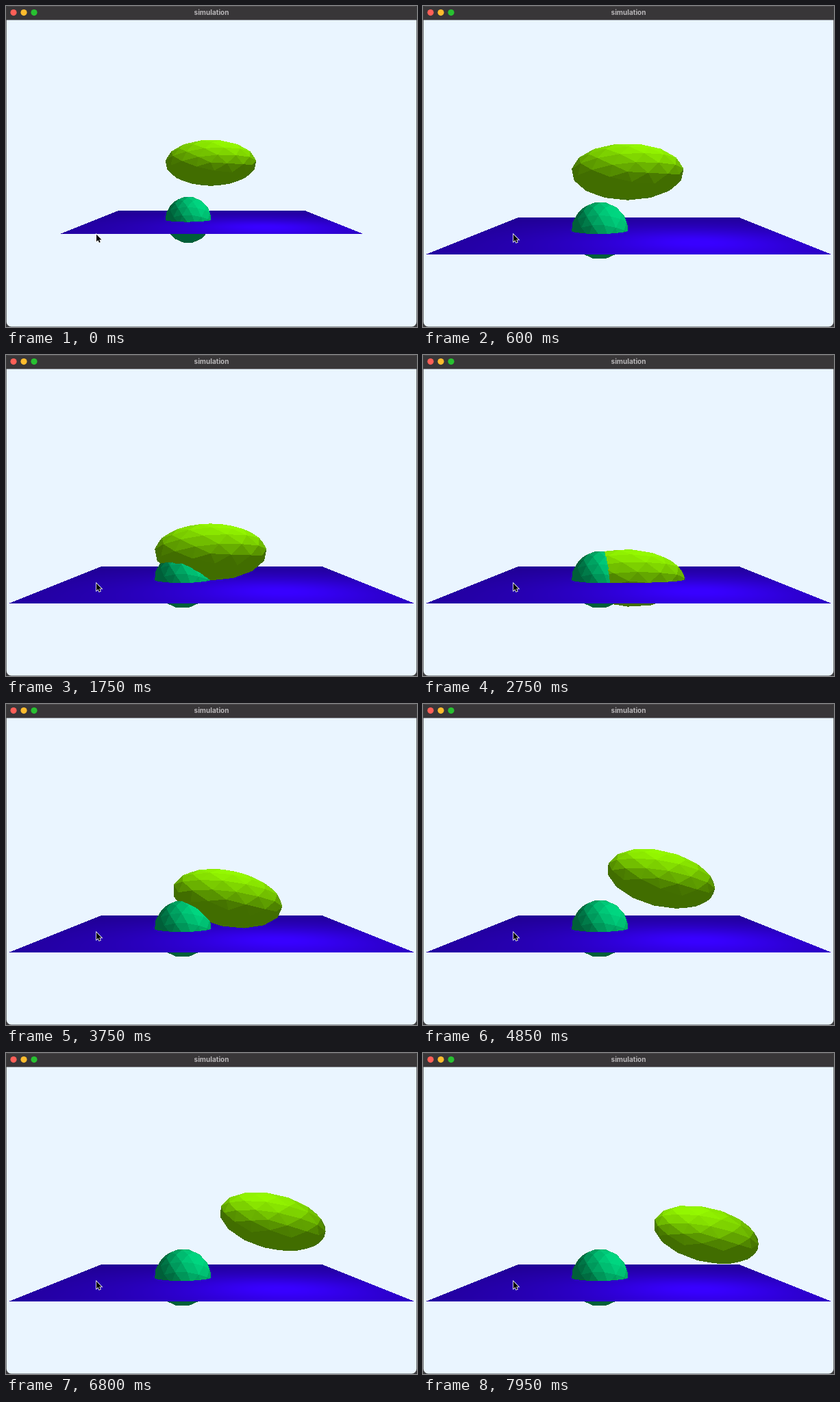
An HTML page with a canvas for the animation above (8 s loop, 600 by 469 pixels).

```html
<!DOCTYPE html>
<html lang="en">
<head>
<meta charset="utf-8">
<title>simulation</title>
<style>
  html, body { margin: 0; width: 100%; height: 100%; overflow: hidden; background: #2a2a2a; }
  canvas { display: block; }
</style>
</head>
<body>
<canvas id="stage" width="600" height="469"></canvas>
<script>
const W = 600, H = 469, BAR = 20.5, LOOP = 8000;
const FOCAL = 710.4, CX = 300, HORIZON = 244.5, EYE = 2, HALF_PLANE = 5;
const ctx = document.getElementById('stage').getContext('2d');
const image = ctx.createImageData(W, H);
const pixels = new Uint32Array(image.data.buffer);
const depth = new Float32Array(W * H);

const rgb = (color, level) => {
  const [r, g, b] = color.map(c => Math.min(255, c * level));
  return (255 << 24 | b << 16 | g << 8 | r) >>> 0;
};
const sub = (a, b) => a.map((v, i) => v - b[i]);
const dot = (a, b) => a[0] * b[0] + a[1] * b[1] + a[2] * b[2];
const cross = (a, b) => [a[1] * b[2] - a[2] * b[1], a[2] * b[0] - a[0] * b[2], a[0] * b[1] - a[1] * b[0]];
const unit = v => { const n = Math.hypot(...v); return v.map(c => c / n); };

// Splits a face into n * n triangles pushed out to the unit sphere.
function splitFace([a, b, c], n) {
  const at = (i, j) => unit(a.map((v, k) => v * (n - i - j) + b[k] * i + c[k] * j));
  const parts = [];
  for (let i = 0; i < n; i++) for (let j = 0; i + j < n; j++) {
    parts.push([at(i, j), at(i + 1, j), at(i, j + 1)]);
    if (i + j < n - 1) parts.push([at(i + 1, j), at(i + 1, j + 1), at(i, j + 1)]);
  }
  return parts;
}

// Subdivided icosahedron with a corner facing the viewer.
function icosphere(spin) {
  const ring = (z, shift) => Array.from({ length: 5 }, (_, i) => {
    const a = (spin + shift + 72 * i) * Math.PI / 180;
    return unit([2 * Math.cos(a), 2 * Math.sin(a), z]);
  });
  const near = ring(1, 0), far = ring(-1, 36), faces = [];
  for (let i = 0; i < 5; i++) {
    const j = (i + 1) % 5;
    faces.push([[0, 0, 1], near[i], near[j]], [near[i], far[i], near[j]],
               [near[j], far[i], far[j]], [[0, 0, -1], far[j], far[i]]);
  }
  return faces.flatMap(face => splitFace(face, 3));
}

const ball = { mesh: icosphere(-18), size: [1, 1, 1], color: [0, 222, 133], light: [2.2, 4, 2.5] };
const egg = { mesh: icosphere(-6), size: [1.98, 1, 1], color: [153, 255, 0], light: [1.5, 7, 2.3] };
const plane = { color: [56, 0, 255], light: [2, 2.5, 3] };

function fillTriangle(points, color) {
  const [[ax, ay, aw], [bx, by, bw], [cx, cy, cw]] = points;
  const area = (bx - ax) * (cy - ay) - (by - ay) * (cx - ax);
  if (Math.abs(area) < 1e-6) return;
  const x0 = Math.max(0, Math.floor(Math.min(ax, bx, cx))), x1 = Math.min(W - 1, Math.ceil(Math.max(ax, bx, cx)));
  const y0 = Math.max(0, Math.floor(Math.min(ay, by, cy))), y1 = Math.min(H - 1, Math.ceil(Math.max(ay, by, cy)));
  for (let y = y0; y <= y1; y++) for (let x = x0; x <= x1; x++) {
    const px = x + 0.5 - ax, py = y + 0.5 - ay;
    const v = (px * (cy - ay) - py * (cx - ax)) / area;
    const w = (py * (bx - ax) - px * (by - ay)) / area;
    if (v < 0 || w < 0 || v + w > 1) continue;
    const near = aw + v * (bw - aw) + w * (cw - aw), i = y * W + x;
    if (near > depth[i]) { depth[i] = near; pixels[i] = color; }
  }
}

function drawBody(body, center, camera, tilt = 0, yaw = 0) {
  const ct = Math.cos(tilt), st = Math.sin(tilt), cy = Math.cos(yaw), sy = Math.sin(yaw);
  const place = p => {
    const [x, y, z] = p.map((v, i) => v * body.size[i]);
    const turned = x * cy - z * sy;
    return [center[0] + turned * ct + y * st, center[1] - turned * st + y * ct, center[2] + x * sy + z * cy];
  };
  const project = ([x, y, z]) => {
    const s = FOCAL / (camera - z);
    return [CX + x * s, HORIZON - (y - EYE) * s, s];
  };
  for (const face of body.mesh) {
    const [a, b, c] = face.map(place);
    const mid = a.map((v, i) => (v + b[i] + c[i]) / 3);
    let normal = unit(cross(sub(b, a), sub(c, a)));
    if (dot(normal, sub(mid, center)) < 0) normal = normal.map(v => -v);
    const glow = Math.max(0, dot(normal, unit(sub(body.light, mid))));
    fillTriangle([a, b, c].map(project), rgb(body.color, 0.43 + 0.55 * glow));
  }
}

function drawPlane(camera) {
  const [lx, ly, lz] = plane.light;
  for (let row = Math.ceil(HORIZON); row < H; row++) {
    const scale = (row + 0.5 - HORIZON) / EYE, z = camera - FOCAL / scale;
    if (Math.abs(z) > HALF_PLANE) continue;
    const reach = HALF_PLANE * scale;
    for (let col = Math.max(0, Math.round(CX - reach)); col < Math.min(W, CX + reach); col++) {
      const x = (col + 0.5 - CX) / scale, i = row * W + col;
      depth[i] = scale;
      pixels[i] = rgb(plane.color, 0.45 + 0.56 * ly / Math.hypot(x - lx, ly, z - lz));
    }
  }
}

function circle(x, y, r, color) {
  ctx.fillStyle = color;
  ctx.beginPath();
  ctx.arc(x, y, r, 0, 7);
  ctx.fill();
}

function drawWindow() {
  ctx.fillStyle = '#383638';
  ctx.fillRect(0, 0, W, BAR);
  ctx.fillStyle = '#4b494b';
  ctx.fillRect(0, 0, W, 1);
  ['#ff5f57', '#febc2e', '#28c131'].forEach((color, i) => circle(11 + 15 * i, 9.6, 4.6, color));
  ctx.fillStyle = '#b9b7b9';
  ctx.font = 'bold 10px Inter, sans-serif';
  ctx.textAlign = 'center';
  ctx.fillText('simulation', 300, 12.8);
  const frame = new Path2D();
  frame.rect(0, 0, W, H);
  frame.roundRect(0.7, 0, W - 1.4, H - 0.5, [4, 4, 7, 7]);
  ctx.fillStyle = '#3c3c3e';
  ctx.fill(frame, 'evenodd');
}

function drawCursor(x, y) {
  const arrow = new Path2D('M0 0V10.5L2.4 8.3L4 12L5.8 11.2L4.2 7.6H7.5Z');
  ctx.save();
  ctx.translate(x, y);
  ctx.strokeStyle = '#fff';
  ctx.lineWidth = 1.6;
  ctx.stroke(arrow);
  ctx.fillStyle = '#000';
  ctx.fill(arrow);
  ctx.restore();
}

// Free fall, a bounce, then a drifting, tilting arc.
function eggPose(t) {
  const after = Math.max(0, t - 2.6);
  const y = after ? 2.034 - 0.1705 * (t - 6.156) ** 2 : 2.45 - 0.56 * t - 0.163 * t * t;
  return {
    center: [0.535 * Math.max(0, t - 2.66) - 0.03, Math.max(0, y), -0.15 * after],
    tilt: 0.245 * (1 - Math.exp(-1.4 * after)),
    yaw: 0.06 * after
  };
}

function draw(now) {
  const t = now % LOOP / 1000;
  const zoom = Math.min(1, t / 0.5);
  const camera = 21 - 3.96 * zoom * (2 - zoom);
  const pose = eggPose(t);
  pixels.fill(rgb([234, 245, 255], 1));
  depth.fill(0);
  drawPlane(camera);
  drawBody(ball, [-1, 0, 0], camera);
  drawBody(egg, pose.center, camera, pose.tilt, pose.yaw);
  ctx.putImageData(image, 0, 0);
  drawWindow();
  drawCursor(132, 333.8);
  requestAnimationFrame(() => draw(performance.now() - start));
}

const start = performance.now();
draw(0);
</script>
</body>
</html>
```
